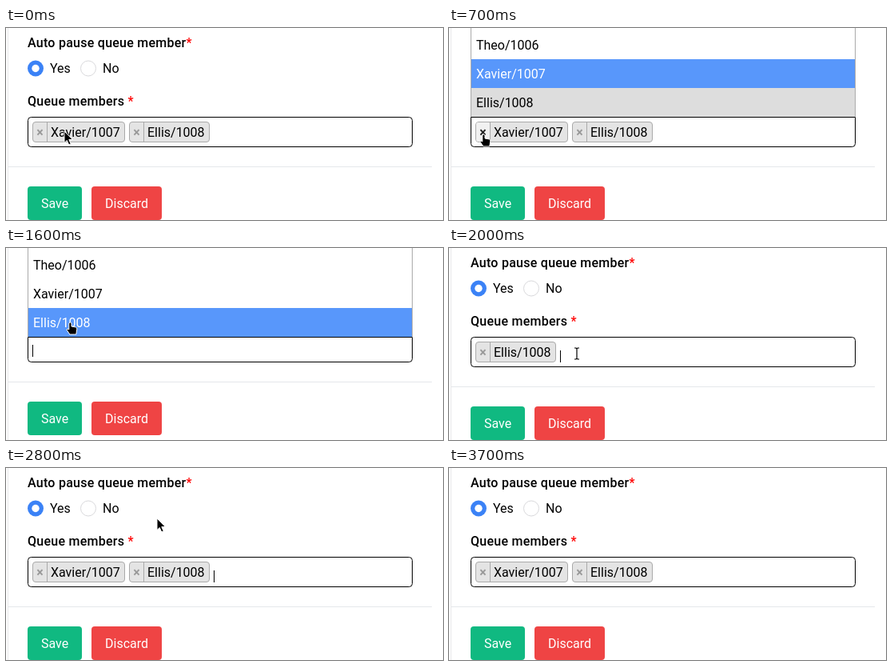
An HTML page for the animation above (3900 ms loop, 547 px wide and 240 px high).

```html
<!DOCTYPE html>
<html lang="en">
<head>
<meta charset="utf-8">
<title>Queue members</title>
<style>
html, body { margin: 0; width: 100%; height: 100%; overflow: hidden; background: #fff; }
svg { display: block; font: 16px Roboto, sans-serif; }
.label { font-weight: 500; letter-spacing: .25px; }
</style>
</head>
<body>
<svg id="stage" width="547" height="240" viewBox="0 0 547 240"></svg>
<script>
const LOOP = 3900, STEP = 100, BLUE = '#5897fb';
const names = ['Theo/1006', 'Xavier/1007', 'Ellis/1008'];
const tagWidths = [0, 116, 101];

// Pointer path: time, x, y
const path = [
  [0, 73, 129], [300, 56, 134], [500, 45, 136], [700, 43, 133], [1000, 43, 133],
  [1100, 42, 134], [1500, 78, 93], [1700, 82, 92], [2000, 160, 132], [2200, 161, 135],
  [2400, 161, 135], [2500, 164, 138], [2600, 190, 82], [2700, 189, 64], [2900, 188, 62],
  [3000, 181, 100], [3100, 179, 116], [3200, 179, 116], [3300, 140, 70], [3400, 80, 2],
  [3500, 60, -30], [LOOP, 60, -30]
];

const pointers = {
  arrow: '<path d="M0 0V14.5L3.3 11.5 5.7 17 8.2 15.9 5.8 10.5H10.4Z" stroke="#fff"/>',
  hand: '<path d="M-1.2 1Q.5-1.2 2 1V5L7.4 6Q9 6.4 8.8 8.2L7.8 15H-.2L-4 9.2Q-3.4 7-1.2 9Z" stroke="#fff"/>',
  beam: ['#fff" stroke-width="3', '#000" stroke-width="1.2'].map(s =>
    `<path d="M-3-7H-1L0-6 1-7H3M0-6V6M-3 7H-1L0 6 1 7H3" fill="none" stroke="${s}"/>`).join('')
};

const rect = (x, y, w, h, fill, extra = '') =>
  `<rect x="${x}" y="${y}" width="${w}" height="${h}" fill="${fill}" ${extra}/>`;
const text = (x, y, s, fill = '#000', extra = '') =>
  `<text x="${x}" y="${y}" fill="${fill}" ${extra}>${s}</text>`;

function pointerAt(t) {
  const i = path.findIndex(p => p[0] > t);
  const [t0, x0, y0] = path[i - 1], [t1, x1, y1] = path[i];
  const k = (t - t0) / (t1 - t0);
  return [Math.round(x0 + (x1 - x0) * k), Math.round(y0 + (y1 - y0) * k)];
}

function selectedAt(t) {
  if (t < 800 || t >= 2800) return [1, 2];
  return t >= 1000 && t < 1700 ? [] : [2];
}

function form(dy) {
  const star = '<tspan fill="#f00">*</tspan>';
  const button = (x, w, s, fill) => rect(x, 198 + dy, w, 42, fill, 'rx="4"') +
    text(x + w / 2, 225 + dy, s, '#fff', 'text-anchor="middle"');
  return rect(2, 0, 1, 240, '#e9e9eb') +
    text(27, 24, 'Auto pause queue member' + star, '#000', 'class="label"') +
    '<circle cx="37" cy="50.5" r="10" fill="#3b82f6"/><circle cx="37" cy="50.5" r="4.7" fill="#fff"/>' +
    '<circle cx="103" cy="50.5" r="9.5" fill="#fff" stroke="#d9d9dc"/>' +
    text(55, 56, 'Yes') + text(121, 56, 'No') +
    text(27, 97, 'Queue members ' + star, '#000', 'class="label"') +
    rect(3, 173 + dy, 530, 1, '#e5e7eb') +
    button(27, 68, 'Save', '#10b981') + button(107, 88, 'Discard', '#ef4444');
}

function dropdown(selected, active) {
  let out = rect(27, 0, 482, 111, '#aaa') + rect(28, 0, 480, 111, '#fff');
  if (active < 0) out += rect(28, 0, 480, 3, BLUE);
  names.forEach((name, i) => {
    const y = 3 + i * 36, on = i === active;
    if (on || selected.includes(i)) out += rect(28, y, 480, 36, on ? BLUE : '#ddd');
    out += text(34, y + 24, name, on ? '#fff' : '#000');
  });
  return out;
}

function tag(x, i, hover) {
  const w = tagWidths[i];
  return rect(x + .5, 117.5, w - 1, 25, '#e4e4e4', 'rx="3.5" stroke="#aaa"') +
    (hover ? rect(x + 1, 118, 17, 24, '#f1f1f1', 'rx="3"') : '') +
    rect(x + 18, 118, 1, 24, '#aaa') +
    text(x + 9.5, 136, '×', hover ? '#222' : '#999', 'font-weight="700" text-anchor="middle"') +
    text(x + 23, 136, names[i]);
}

function draw(t) {
  const [mx, my] = pointerAt(t);
  const selected = selectedAt(t);
  const open = t >= 600 && t < 1700 || t >= 2300 && t < 2800;
  const dy = selected.length ? 0 : -6;
  const inRows = open && my < 111;
  const active = inRows ? Math.floor((my - 3) / 36) : selected.length ? selected[0] : -1;

  let pointer = inRows ? 'hand' : my >= 111 ? 'beam' : 'arrow';
  let out = form(dy);
  if (open) out += dropdown(selected, active);
  const top = open ? 'M27.5 111.5H508.5' : 'M27.5 115.5q0-4 4-4H504.5q4 0 4 4';
  out += `<path d="${top}V${144.5 + dy}q0 4-4 4H31.5q-4 0-4-4Z" fill="#fff" stroke="#000"/>`;

  let x = 33;
  for (const i of selected) {
    const inTag = my >= 118 && my < 143 && mx >= x && mx < x + tagWidths[i];
    const onCross = inTag && mx < x + 19;
    if (inTag) pointer = onCross ? 'hand' : 'arrow';
    out += tag(x, i, onCross);
    x += tagWidths[i] + 5;
  }
  if (t >= 1000 && t < 3700)
    out += rect(x, selected.length ? 128 : 121, 1, 15, '#000');
  out += `<g transform="translate(${mx} ${my})">${pointers[pointer]}</g>`;
  stage.innerHTML = out;
}

const stage = document.getElementById('stage');
const start = performance.now();
let last = -1;
function tick() {
  const t = Math.floor((performance.now() - start) % LOOP / STEP) * STEP;
  if (t !== last) draw(last = t);
  requestAnimationFrame(tick);
}
tick();
</script>
</body>
</html>
```
